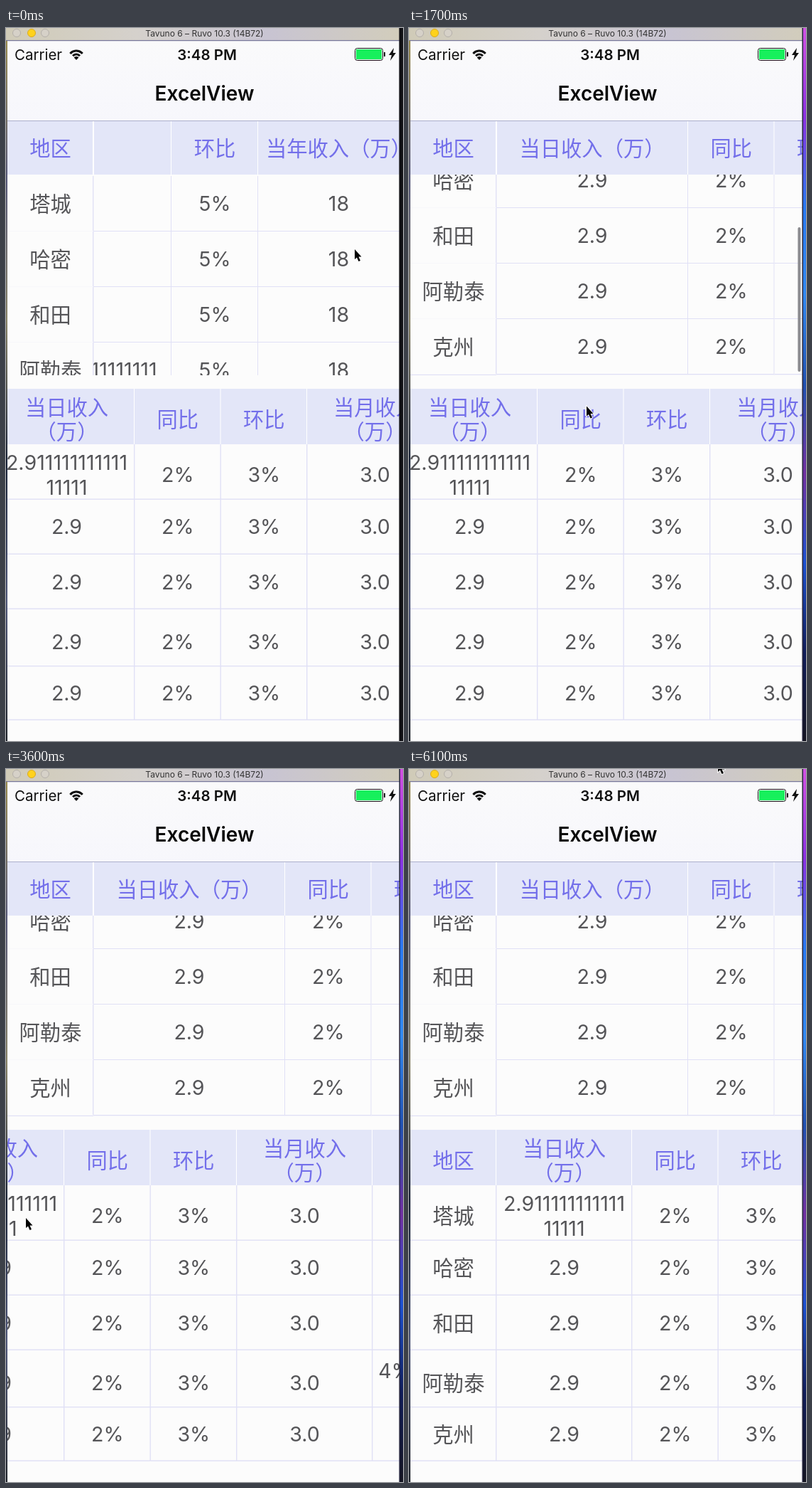
An HTML page with a canvas for the animation above (6.2 s loop, 559 by 1002 pixels).

```html
<!DOCTYPE html>
<html lang="zh">
<head>
<meta charset="utf-8">
<title>ExcelView</title>
<style>
html, body { margin: 0; width: 100%; height: 100%; overflow: hidden; background: #fcfcfc; }
canvas { display: block; }
</style>
</head>
<body>
<canvas id="stage" width="559" height="1002"></canvas>
<script>
const ctx = document.getElementById('stage').getContext('2d');
const LOOP = 6200, STEP = 100;
const LEFT = 2, RIGHT = 554;
const HEAD = '#e3e6f8', BODY = '#fcfcfc', RULE = '#e0e0f6';
const INK = '#555558', VIOLET = '#736fea';

const ones = n => '1'.repeat(n);
const titles = ['地区', '当日收入（万）', '同比', '环比', '当月收入（万）',
  '同比', '环比', '当年收入（万）', '同比', '环比'];
const places = ['塔城', '哈密', '和田', '阿勒泰', '克州'];
const values = ['2.9', '2%', '3%', '3.0', '4%', '5%', '18', '4.5%', '6.8%'];

function makeRows(breakText) {
  const gap = breakText ? '\n' : '';
  const rows = places.map(place => [place, ...values]);
  rows[0][1] = '2.9' + ones(11) + gap + ones(5);
  rows[3][5] = '4%' + ones(11) + gap + ones(9);
  return rows;
}

function columnEdges(widths) {
  const edges = [LEFT];
  widths.forEach(w => edges.push(edges[edges.length - 1] + w));
  return edges;
}

const upper = {
  edges: columnEdges([121, 270, 121.5, 121.5, 227, 320, 122, 227, 122, 122]),
  rows: makeRows(false)
};
const lower = {
  edges: columnEdges([121, 191, 121.5, 121.5, 191, 191, 121.5, 191, 121.5, 121.5]),
  rows: makeRows(true),
  lines: [585, 662, 739, 816, 896.5, 972],
  centers: [628, 701, 778.5, 863, 935]
};

// Tracks hold [time, value...] keys.
const upperX = [[0, 950], [150, 950], [450, 300], [750, 0]];
const upperY = [[700, 0], [1050, 204], [1100, 204], [1500, 111]];
const lowerX = [[1900, 133], [2300, 68], [2700, 0], [3200, 0], [3600, 232],
  [4000, 890], [4200, 941], [4400, 941], [4800, 0]];
const pointer = [[0, 491, 312], [150, 250, 345], [450, 500, 345], [700, 270, 380],
  [1000, 270, 190], [1100, 270, 183], [1500, 300, 400], [1900, 200, 665],
  [2300, 265, 670], [2600, 335, 670], [3200, 260, 645], [3600, 28, 632],
  [3800, 290, 640], [4000, 141, 639], [4300, 110, 650], [4600, 270, 690],
  [4900, 365, 701], [5400, 385, 480], [6100, 435, -9]];
const presses = [[200, 450], [750, 1000], [2000, 2600], [3300, 3500], [3800, 3900], [4300, 4600]];

function sample(track, t) {
  if (t <= track[0][0]) return track[0].slice(1);
  for (let i = 1; i < track.length; i++) {
    const a = track[i - 1], b = track[i];
    if (t > b[0]) continue;
    const u = (t - a[0]) / (b[0] - a[0]);
    const ease = u * u * (3 - 2 * u);
    return a.slice(1).map((v, k) => v + (b[k + 1] - v) * ease);
  }
  return track[track.length - 1].slice(1);
}

function rect(x, y, w, h, color) {
  ctx.fillStyle = color;
  ctx.fillRect(x, y, w, h);
}

function gradient(x, y, w, h, colors, vertical = true) {
  const g = vertical ? ctx.createLinearGradient(0, y, 0, y + h) : ctx.createLinearGradient(x, 0, x + w, 0);
  colors.forEach((c, i) => g.addColorStop(i / (colors.length - 1), c));
  rect(x, y, w, h, g);
}

function disc(x, y, r, fill, stroke) {
  ctx.beginPath();
  ctx.arc(x, y, r, 0, 2 * Math.PI);
  ctx.fillStyle = fill;
  ctx.fill();
  ctx.strokeStyle = stroke;
  ctx.lineWidth = 1;
  ctx.stroke();
}

function clipped(x, y, w, h, draw) {
  ctx.save();
  ctx.beginPath();
  ctx.rect(x, y, w, h);
  ctx.clip();
  draw();
  ctx.restore();
}

function text(str, x, y, font, color, align = 'center') {
  ctx.font = font;
  ctx.fillStyle = color;
  ctx.textAlign = align;
  ctx.fillText(str, x, y);
}

function cellText(str, x, y, color) {
  const parts = str.split('\n');
  parts.forEach((part, i) => {
    const latin = /^[\d.%]+$/.test(part);
    const font = latin ? '28.6px Inter, sans-serif' : '29.3px "Noto Sans CJK SC", "Noto Sans CJK", sans-serif';
    text(part, x, y + (i - (parts.length - 1) / 2) * 34.5 + (latin ? 10.3 : 11), font, color);
  });
}

// Calls draw(column, left edge, right edge) for the columns in view.
function eachColumn(edges, scroll, first, draw) {
  for (let c = first; c < edges.length - 1; c++) {
    const a = edges[c] - scroll, b = edges[c + 1] - scroll;
    if (b > LEFT && a < RIGHT) draw(c, a, b);
  }
}

function drawUpper(sx, sy) {
  const { edges, rows } = upper;
  const split = edges[1];
  const body = (c, a, b) => rows.forEach((row, r) => {
    const center = 247 + r * 78 - sy;
    rect(a, center - 39, b - a, 78, BODY);
    rect(a, center + (c ? 38 : 38.8), b - a, 1.4, RULE);
    rect(b - 1, center - 39, 1.4, 77, RULE);
    cellText(row[c], (a + b) / 2, center, INK);
  });
  const head = (c, a, b) => {
    rect(a, 131, b - a, 75, HEAD);
    rect(b - 1, 131, 2, 75, '#fff');
    cellText(titles[c], (a + b) / 2, 169, VIOLET);
  };
  clipped(split, 206, RIGHT - split, 282, () => eachColumn(edges, sx, 1, body));
  clipped(LEFT, 206, split - LEFT + 1, 282, () => body(0, LEFT, split));
  clipped(split, 131, RIGHT - split, 75, () => eachColumn(edges, sx, 1, head));
  clipped(LEFT, 131, split - LEFT + 1, 75, () => head(0, LEFT, split));
}

function drawLower(sx) {
  const { edges, rows, lines, centers } = lower;
  clipped(LEFT, 507, RIGHT - LEFT, 480, () => eachColumn(edges, sx, 0, (c, a, b) => {
    const mid = (a + b) / 2;
    rect(a, 507, b - a, 78, HEAD);
    rect(b - 1, 507, 2, 78, '#fff');
    cellText(titles[c].replace('（', '\n（'), mid, 550, VIOLET);
    rows.forEach((row, r) => {
      rect(a, lines[r + 1] - 0.5, b - a, 1.4, RULE);
      cellText(row[c], mid, centers[r], INK);
    });
    rect(b - 1, 585, 1.4, 387, RULE);
  }));
}

function drawScrollbar(t, sy) {
  if (t < 750 || t > 1700) return;
  const height = 203 - Math.max(0, sy - 111) * 0.16;
  const top = sy > 111 ? 483 - height : 206 + 74 * sy / 111;
  ctx.fillStyle = '#8c8c90';
  ctx.beginPath();
  ctx.roundRect(547.5, top, 4, height, 2);
  ctx.fill();
}

function drawChrome() {
  gradient(0, 0, 554, 18, ['#d0cbb8', '#d5d1cc', '#c8c4d2', '#d2cdbc'], false);
  rect(0, 17, 554, 1.5, '#77779a');
  disc(15, 7, 5.5, '#d6d1c8', '#b5b0aa');
  disc(36, 7, 5.5, '#ffd21c', '#d9aa20');
  disc(55, 7, 5.5, '#d6d1c8', '#b5b0aa');
  text('Tavuno 6 – Ruvo 10.3 (14B72)', 279.5, 11.5, '12px Inter, sans-serif', '#333');

  gradient(LEFT, 18.5, RIGHT - LEFT, 112, ['#fafafb', '#f7f7fc']);
  rect(LEFT, 130, RIGHT - LEFT, 1, '#adb0cc');
  text('Carrier', 12, 44.5, '20.5px Inter, sans-serif', '#111', 'left');
  text('3:48 PM', 283, 44.5, '600 20.5px Inter, sans-serif', '#111');
  text('ExcelView', 279.5, 102, '600 28px Inter, sans-serif', '#080808');

  ctx.strokeStyle = '#111';
  ctx.lineWidth = 3;
  for (const r of [6.5, 11.5]) {
    ctx.beginPath();
    ctx.arc(99, 43.5, r, -Math.PI * 0.77, -Math.PI * 0.23);
    ctx.stroke();
  }
  ctx.fillStyle = '#111';
  ctx.beginPath();
  ctx.moveTo(99, 45);
  ctx.arc(99, 44.5, 4.5, -Math.PI * 0.77, -Math.PI * 0.23);
  ctx.fill();

  ctx.lineWidth = 1;
  ctx.beginPath();
  ctx.roundRect(491.5, 28.5, 39, 17, 3);
  ctx.stroke();
  rect(493, 30, 36, 14, '#17f05c');
  rect(532, 34, 2, 6, '#111');
  ctx.fill(new Path2D('M546 28 L539 38 H543 L541 46 L549 35 H545 Z'));
}

function drawEdges(t) {
  gradient(0, 18, 2, 984, ['#9a8c50', '#565878', '#8a8468', '#1b2438', '#50587a', '#23272e']);
  if (t < STEP) {
    rect(553.5, 0, 5.5, 1002, '#101014');
    return;
  }
  rect(553.5, 0, 1.5, 1002, '#24243c');
  gradient(555, 0, 4, 1002, ['#d050e0', '#8a30e0', '#2878f0', '#3088f0', '#2050b0',
    '#7030a0', '#1c50d0', '#101c58', '#141420']);
}

function drawPointer(t) {
  const [x, y] = sample(pointer, t);
  if (presses.some(([from, to]) => t >= from && t <= to)) {
    ctx.strokeStyle = '#080810';
    ctx.lineWidth = 3;
    ctx.beginPath();
    ctx.arc(x + 0.5, y, 19.5, 0, 2 * Math.PI);
    ctx.stroke();
  }
  ctx.save();
  ctx.translate(x, y);
  const arrow = new Path2D('M0 -1 V13 L3 10.5 L5.5 16 L8 15 L5.5 9.5 H9.5 Z');
  ctx.lineWidth = 1.8;
  ctx.strokeStyle = '#fff';
  ctx.stroke(arrow);
  ctx.fillStyle = '#000';
  ctx.fill(arrow);
  ctx.restore();
}

function render(now) {
  const t = Math.floor((now % LOOP) / STEP) * STEP;
  const [sy] = sample(upperY, t);
  rect(0, 0, 559, 1002, BODY);
  drawUpper(sample(upperX, t)[0], sy);
  drawLower(sample(lowerX, t)[0]);
  drawScrollbar(t, sy);
  drawChrome();
  drawEdges(t);
  drawPointer(t);
}

let start;
function frame(now) {
  start ??= now;
  render(now - start);
  requestAnimationFrame(frame);
}
render(0);
requestAnimationFrame(frame);
</script>
</body>
</html>
```
